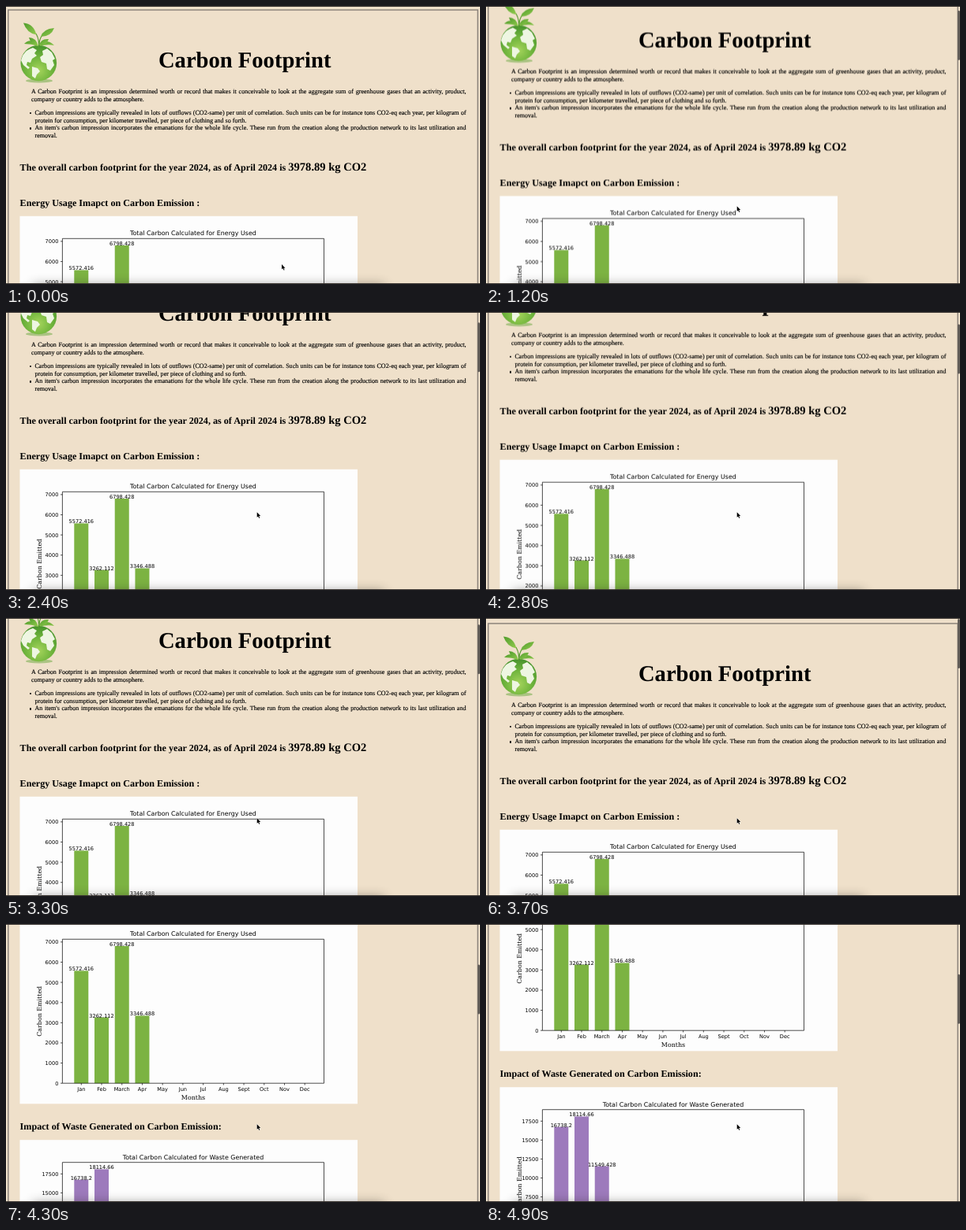
Animation of 600 by 353 pixels, one loop 5000 ms. Source, as an HTML page:

```html
<!DOCTYPE html>
<html lang="en">
<head>
<meta charset="utf-8">
<title>Carbon Footprint</title>
<style>
  html, body { margin: 0; width: 100%; height: 100%; overflow: hidden; background: #efe0ca; }
  body { position: relative; text-rendering: geometricPrecision; }
  #page, #page svg { position: absolute; left: 0; top: 0; width: 600px; height: 1960px; }
  #page { will-change: transform; }
  .copy { position: absolute; margin: 0; padding: 0; font: 8.06px/9.6px "Liberation Serif", serif; text-align: justify; color: #000; -webkit-text-stroke: .15px #000; }
  p.copy { left: 32px; top: 104px; width: 550.5px; }
  ul.copy { left: 36.5px; top: 131.2px; width: 546px; list-style: none; }
  .copy li { position: relative; }
  .copy li::before { content: ""; position: absolute; left: -7px; top: 3.6px; width: 2.6px; height: 2.6px; border-radius: 50%; background: #000; }
  .head { font: bold 12.13px "Liberation Serif", serif; }
  .sans { font: 6.6px "DejaVu Sans", sans-serif; }
  .label { font: 7.92px "DejaVu Serif", serif; text-anchor: middle; }
  .title { font: 7.92px "DejaVu Sans", sans-serif; text-anchor: middle; }
  .mid { text-anchor: middle; }
  .end { text-anchor: end; }
  .fixed { position: absolute; }
  #thumb { right: 0; top: 1px; width: 3px; height: 63px; border-radius: 2px; background: #625d58; }
  #dock { left: 36px; top: 356px; width: 440px; height: 20px; box-shadow: 0 0 14px 2px rgba(40, 35, 30, .45); }
  .edge { left: 0; width: 600px; height: 1px; background: #38332f; }
  #cursor { left: 0; top: 0; width: 8px; height: 11px; overflow: visible; }
</style>
</head>
<body>
<div id="page">
  <svg id="art" viewBox="0 0 600 1960">
    <defs>
      <radialGradient id="globe" cx=".5" cy=".7" r=".75">
        <stop offset="0" stop-color="#a5d45c"/>
        <stop offset=".5" stop-color="#6fb43c"/>
        <stop offset="1" stop-color="#3f8d2a"/>
      </radialGradient>
      <linearGradient id="leaf" x2="1" y2="1">
        <stop offset="0" stop-color="#4f9c2c"/>
        <stop offset="1" stop-color="#94cb4e"/>
      </linearGradient>
    </defs>
    <rect x="2.8" y="5" width="594.4" height="1950" fill="none" stroke="#8c837b" stroke-width="1.5"/>
    <ellipse cx="42" cy="95" rx="17" ry="2.4" fill="#8fb766" opacity=".7"/>
    <circle cx="41.3" cy="72.5" r="22.8" fill="url(#globe)"/>
    <g fill="#eef6e2">
      <path d="M21 63q5-8 13-10l5 3-3 4 3 3-6 4-2 5-4-1-1 4 4 3-2 2-6-5-3-6z"/>
      <path d="M33 77l7 2 3 4-4 4-2 5-4-3z"/>
      <path d="M46 57l6-3 6 5 4 8-3 2 2 6-5 7-4-2-1-7-6-2-2-6 4-3z"/>
    </g>
    <path d="M41 54Q43 44 38 35M42 50Q42 42 46 37" fill="none" stroke="#5a9a30" stroke-width="1.2"/>
    <g fill="url(#leaf)">
      <path d="M22 21.5q13 1 16.5 15-12-2-16.500-15z"/>
      <path d="M44 39q3-10 17-11-4 11-17 11z"/>
      <path d="M23 48q8-9 18 3-9-3-18-3z"/>
      <path d="M29 40q9 0 12 11-10-2-12-11z"/>
      <path d="M42 51q10-11 19-1-9-2-19 1z"/>
      <path d="M42 50q2-9 12-8-2 8-12 8z"/>
    </g>
    <text x="302.2" y="78.1" class="mid" style="font:bold 28.6px 'Liberation Serif',serif">Carbon Footprint</text>
    <text x="17.6" y="209.4" class="head">The overall carbon footprint for the year 2024, as of April 2024 is <tspan font-size="14.55">3978.89 kg CO2</tspan></text>
    <text x="17.6" y="254.3" class="head">Energy Usage Imapct on Carbon Emission :</text>
    <text x="17.6" y="537.3" class="head">Impact of Waste Generated on Carbon Emission:</text>
  </svg>
  <p class="copy">A Carbon Footprint is an impression determined worth or record that makes it conceivable to look at the aggregate sum of greenhouse gases that an activity, product, company or country adds to the atmosphere.</p>
  <ul class="copy">
    <li>Carbon impressions are typically revealed in lots of outflows (CO2-same) per unit of correlation. Such units can be for instance tons CO2-eq each year, per kilogram of protein for consumption, per kilometer travelled, per piece of clothing and so forth.</li>
    <li>An item's carbon impression incorporates the emanations for the whole life cycle. These run from the creation along the production network to its last utilization and removal.</li>
  </ul>
</div>
<div id="dock" class="fixed"></div>
<div class="fixed edge" style="top:0"></div>
<div class="fixed edge" style="top:352px"></div>
<div id="thumb" class="fixed"></div>
<svg id="cursor" class="fixed"><path transform="scale(.88)" d="M0 0V7.2L1.7 5.8 2.9 8.6 4.1 8.1 2.9 5.3H5.1Z" stroke="#fff" stroke-width=".9" paint-order="stroke"/></svg>
<script>
const $ = id => document.getElementById(id);
const months = 'Jan Feb March Apr May Jun Jul Aug Sept Oct Nov Dec'.split(' ');

function chart(top, title, color, step, values) {
  const left = 71.4, right = 402.5, ceil = top + 28.5, floor = top + 211.4, gap = 25.72;
  const max = Math.max(...values) * 1.05;
  const x = i => 95.3 + i * gap;
  const y = v => floor - v / max * (floor - ceil);
  const middle = (left + right) / 2, center = (ceil + floor) / 2;
  let bars = '', names = '', ticks = '', out = '';
  values.forEach((v, i) => {
    bars += `<rect x="${x(i) - gap * .35}" y="${y(v)}" width="${gap * .7}" height="${floor - y(v)}" fill="${color}"/>`;
    names += `<text class="sans mid" x="${x(i)}" y="${y(v)}">${v}</text>`;
  });
  months.forEach((m, i) => {
    ticks += `M${x(i)} ${floor}v2.3`;
    out += `<text class="sans mid" x="${x(i)}" y="${floor + 10.1}">${m}</text>`;
  });
  for (let v = 0; v < max; v += step) {
    ticks += `M${left} ${y(v)}h-2.3`;
    out += `<text class="sans end" x="66.4" y="${y(v) + 2.5}">${v}</text>`;
  }
  return `<rect x="17.5" y="${top}" width="427.5" height="237.5" fill="#fdfdfd"/>${bars}
    <path d="M${left} ${ceil}H${right}V${floor}H${left}Z${ticks}" fill="none" stroke="#000" stroke-width=".7"/>
    ${out}${names}
    <text class="title" x="${middle}" y="${ceil - 4}">${title}</text>
    <text class="label" x="${middle}" y="${floor + 20.4}">Months</text>
    <text class="label" transform="translate(44.6 ${center}) rotate(-90)">Carbon Emitted</text>`;
}

$('art').insertAdjacentHTML('beforeend',
  chart(266.8, 'Total Carbon Calculated for Energy Used', '#7cb342', 1000, [5572.416, 3262.112, 6798.428, 3346.488]) +
  chart(550.2, 'Total Carbon Calculated for Waste Generated', '#9d7abc', 2500, [16738.2, 18114.66, 11549.428]));

// [time in ms, scroll offset in px]
const scrollKeys = [[0, 0], [800, 0], [900, 5], [1000, 14], [1200, 25.5], [1500, 38], [1800, 47.2],
  [2300, 64], [2800, 79.2], [3000, 76], [3200, 55], [3400, 25], [3600, 2], [3700, -2], [3800, -1],
  [3900, 18], [4000, 75], [4100, 155], [4200, 225], [4300, 276], [4400, 300], [4600, 325], [4900, 343]];
// [time in ms, x, y]
const cursorKeys = [[0, 349, 328], [100, 334, 295], [200, 318, 264], [500, 317.7, 254.3]];

function scrollAt(t) {
  const i = scrollKeys.findIndex(k => k[0] >= t);
  if (i < 1) return scrollKeys[0][1];
  const [t0, y0] = scrollKeys[i - 1], [t1, y1] = scrollKeys[i];
  return y0 + (y1 - y0) * (t - t0) / (t1 - t0);
}

function draw() {
  const t = Math.floor(performance.now() % 5000 / 100) * 100;
  const scroll = scrollAt(t);
  const [, cx, cy] = cursorKeys.findLast(k => k[0] <= t);
  $('page').style.transform = `translateY(${-scroll}px)`;
  $('thumb').style.transform = `translateY(${Math.max(0, scroll) * .183}px)`;
  $('thumb').style.visibility = t < 900 ? 'hidden' : 'visible';
  $('cursor').style.transform = `translate(${cx}px, ${cy}px)`;
  requestAnimationFrame(draw);
}
draw();
</script>
</body>
</html>
```
